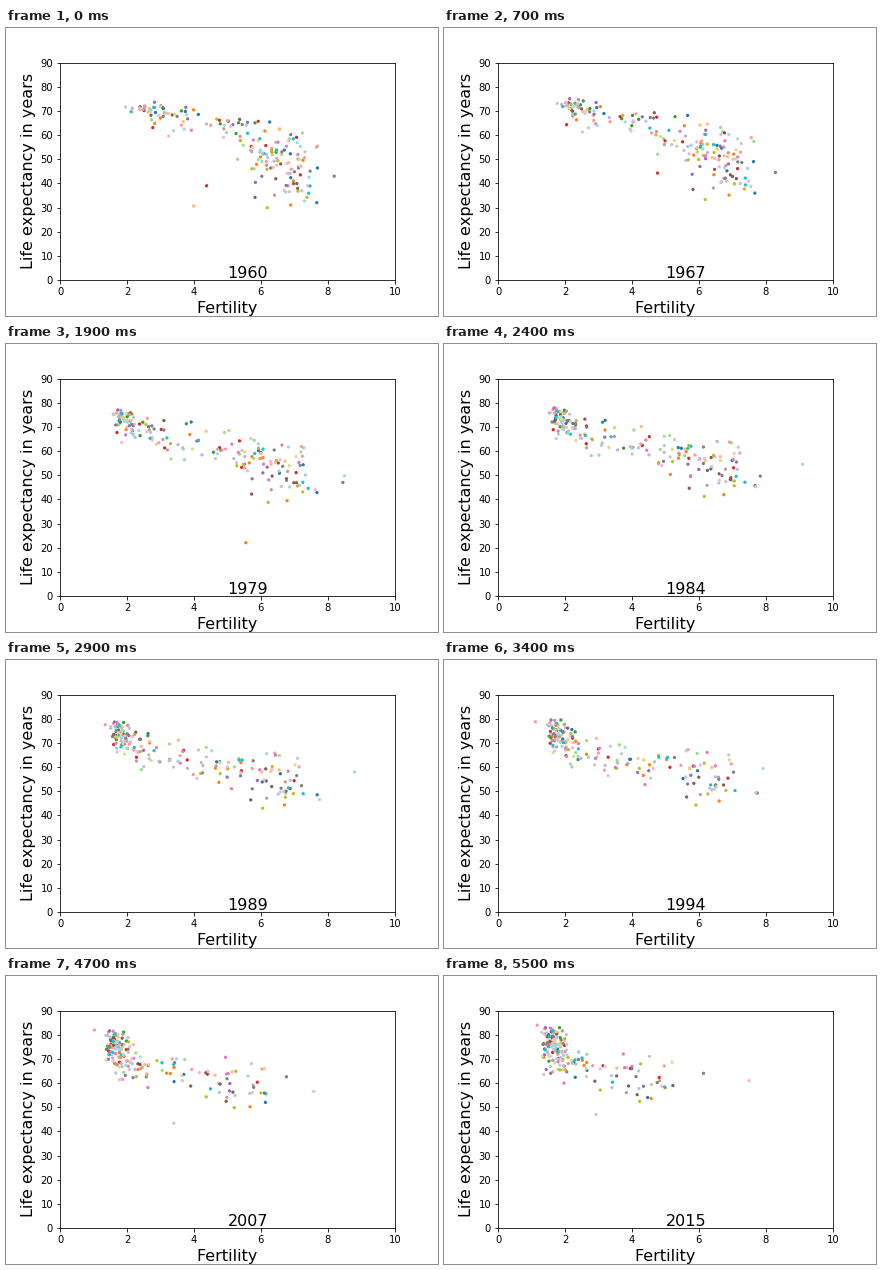
These frames come from a looping animation (432x288 px, 5.6 s). A matplotlib script:

```python
import numpy as np
import matplotlib.pyplot as plt
from matplotlib.animation import FuncAnimation

plt.rcParams["text.kerning_factor"] = 6
YEARS = np.arange(1960, 2016)
T = YEARS - 1960
U = T / T[-1]
COUNT = 176
rng = np.random.default_rng(8)


def noise(scale):
    return scale * np.clip(rng.normal(), -1.9, 1.9)


def country(rank):
    """Path of one country; a higher rank (0 to 1) means earlier development."""
    turn = 63 - 88 * rank + noise(4)           # year when fertility is halfway down
    high = 6.75 + noise(.5)
    low = 1.6 + .5 * np.exp(-T / 15) + noise(.25)
    x = low + (high - low) / (1 + np.exp((T - turn) / 8.5))
    x += .04 * np.sin(T / 5 + 9 * rng.random())
    x = np.maximum(x, 1.9 - .65 * U ** .6 + .25 * rng.random())

    health = np.clip(rank + noise(.07), 0, 1)
    luck = noise(1)
    start = min(39 + 36 * health, 70.5) + luck * 4.2 * (1.2 - health)
    end = 58 + 23.5 * health ** .7 + luck * 3
    y = start + (end - start) * U ** .85
    y += .5 * np.sin(T / 4 + 9 * rng.random())
    return x, np.minimum(y, 74.3 + 9 * U - 2.5 * rng.random())


def track(*points, dip=0, year=0):
    """Path through a few (year, fertility, life) points, with one crisis."""
    t, x, y = np.transpose(points)
    crisis = dip * np.exp(-((YEARS - year) / 3) ** 2)
    return np.interp(YEARS, t, x), np.interp(YEARS, t, y) - crisis


# countries that stand apart: tab20 colour number and path
singles = [
    (0, track((1960, 7.67, 32), (1989, 7.68, 48.5), (1999, 7.8, 50), (2015, 4.47, 54))),
    (19, track((1960, 7.3, 32.7), (1973, 7.77, 44), (1985, 9.22, 55.5),
               (1989, 8.8, 58), (2015, 4.2, 65))),
    (13, track((1960, 7.4, 39), (1989, 7.75, 46.5), (2015, 7.5, 61))),
    (14, track((1960, 8.19, 43), (1979, 8.45, 47), (2015, 4, 66))),
    (2, track((1960, 6.97, 41), (1979, 5.55, 48), (2015, 2.65, 68.5), dip=29, year=1978)),
    (3, track((1960, 3.99, 30.6), (1963, 6.2, 52), (1979, 2.75, 65.5), (2015, 1.57, 76.5))),
    (6, track((1960, 4.38, 39), (1984, 5.7, 57), (2015, 3.95, 66))),
    (15, track((1960, 5.8, 46), (1989, 5, 60), (2007, 3.4, 43.4), (2015, 2.93, 47))),
    (7, track((1960, 5, 66), (1989, 1.35, 77.5), (1999, .88, 80), (2015, 1.17, 83.9))),
]

ranks = rng.permutation(np.linspace(0, 1, COUNT))
hues = [i * 20 // COUNT for i in range(COUNT)] + [hue for hue, _ in singles]
paths = [country(rank) for rank in ranks] + [path for _, path in singles]
order = np.argsort(hues, kind="stable")
places = np.array(paths)[order]                # country, axis, year
colours = plt.get_cmap("tab20")(np.array(hues)[order])

fig = plt.figure(figsize=(6, 4), dpi=72)
fig.subplots_adjust(left=.125, right=.9, bottom=.125, top=.88)
ax = fig.add_subplot()
ax.set_xlim(0, 10)
ax.set_ylim(0, 90)
ax.set_xlabel("Fertility", fontsize=16)
ax.set_ylabel("Life expectancy in years", fontsize=16)
dots = ax.scatter(places[:, 0, 0], places[:, 1, 0], s=5, c=colours)
label = ax.text(5, 1, "1960", fontsize=16)


def update(i):
    dots.set_offsets(places[:, :, i])
    label.set_text(str(YEARS[i]))
    return dots, label


anim = FuncAnimation(fig, update, frames=len(YEARS), interval=100,
                     repeat=True, repeat_delay=0)
plt.show()
```
